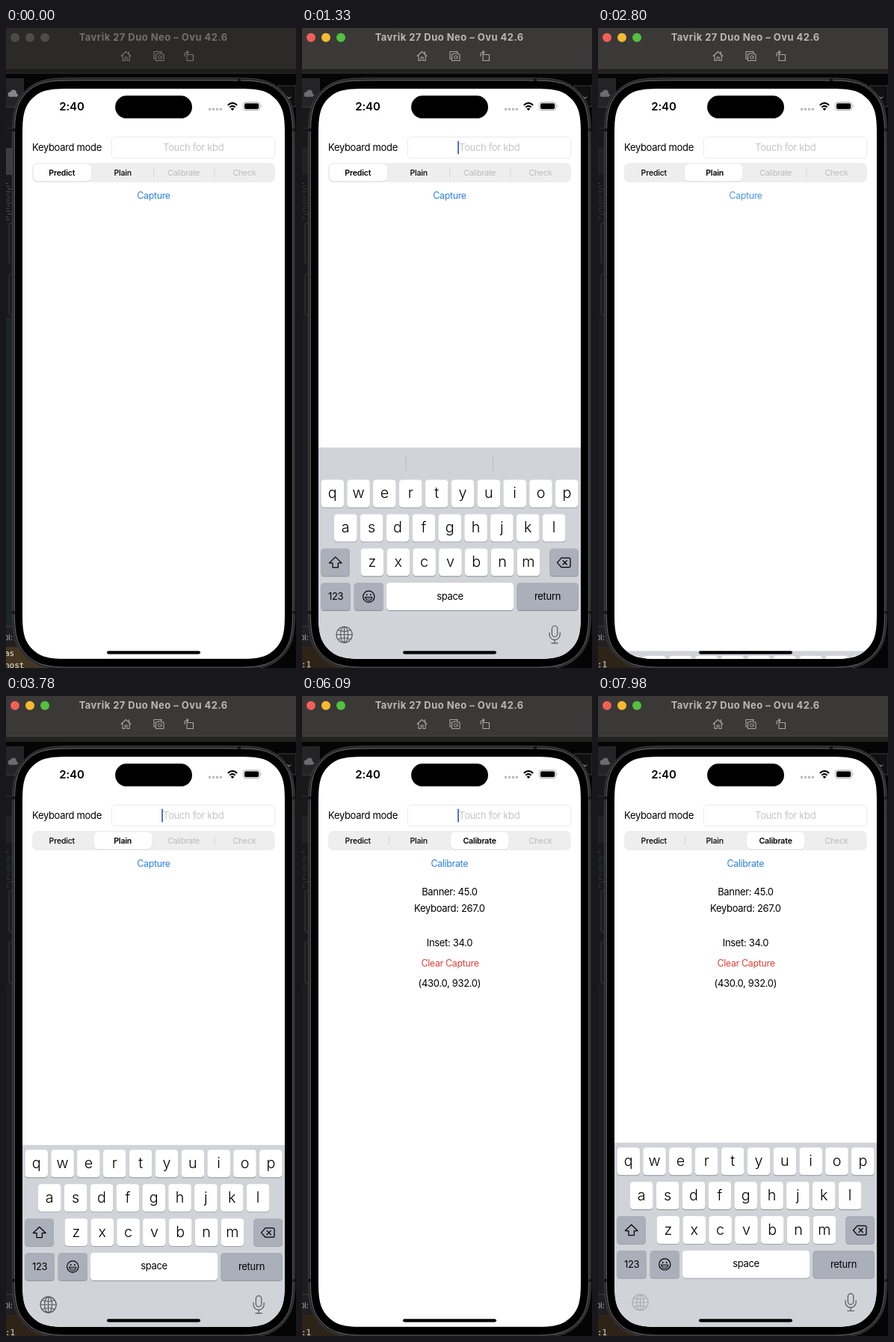
Write an HTML page that moves like this. It is 388 px wide and 854 px high and loops after 8000 ms.

```html
<!DOCTYPE html>
<html lang="en">
<head>
<meta charset="utf-8">
<title>Keyboard mode</title>
<style>
  html, body { margin: 0; width: 100%; height: 100%; overflow: hidden; background: #050505; }
  svg { display: block; width: 388px; height: 854px; }
  text { font-family: Inter, "Open Sans", sans-serif; font-size: 13px; letter-spacing: -.025em; }
  .mid { text-anchor: middle; }
  .title { font-size: 13px; font-weight: 700; letter-spacing: .035em; }
  .clock { font-size: 15px; font-weight: 600; letter-spacing: -.01em; }
  .button { font-size: 12.4px; }
  .segment { font-size: 10.6px; letter-spacing: -.02em; }
  .letter { font-size: 19.8px; font-weight: 300; letter-spacing: 0; }
  .small { font-size: 11px; }
  .mono { font-family: "DejaVu Sans Mono", monospace; font-size: 11px; letter-spacing: 0; }
  .line { fill: none; stroke-linecap: round; stroke-linejoin: round; }
</style>
</head>
<body>
<svg id="stage" viewBox="0 0 388 854"></svg>
<script>
const LOOP = 8000, STEP = 70;
const stage = document.getElementById('stage');

function add(parent, tag, attrs = {}, text) {
  const node = document.createElementNS('http://www.w3.org/2000/svg', tag);
  set(node, attrs);
  if (text !== undefined) node.textContent = text;
  return parent.appendChild(node);
}
function set(node, attrs) {
  for (const name in attrs) node.setAttribute(name, attrs[name]);
}
const group = (parent, attrs) => add(parent, 'g', attrs);
const box = (parent, x, y, width, height, fill, rx = 0, more = {}) =>
  add(parent, 'rect', { x, y, width, height, fill, rx, ...more });
const dot = (parent, cx, cy, r, fill) => add(parent, 'circle', { cx, cy, r, fill });
const label = (parent, x, y, text, fill = '#000', cls = 'mid') =>
  add(parent, 'text', { x, y, fill, class: cls }, text);
const line = (parent, d, stroke, width = 1, more = {}) =>
  add(parent, 'path', { d, stroke, 'stroke-width': width, class: 'line', ...more });

// Rounded rectangle with continuous corners
function squircle(l, t, r, b, radius) {
  const [end, far, near, mid, low, arc, bend] =
    [1.5287, 1.0885, .8684, .6315, .0749, .3728, .1691].map(v => v * radius);
  const half = [[far, 0], [near, 0], [mid, low], [arc, bend], [bend, arc], [low, mid], [0, near], [0, far], [0, end]];
  const corner = (x, y, sx, sy, flip) => {
    const points = flip ? half.map(([u, v]) => [v, u]) : half;
    return 'C' + points.map(([u, v]) => `${x + sx * u} ${y + sy * v}`).join(' ');
  };
  return `M${l + end} ${t}H${r - end}` + corner(r, t, -1, 1) +
    `V${b - end}` + corner(r, b, -1, -1, true) +
    `H${l + end}` + corner(l, b, 1, -1) +
    `V${t + end}` + corner(l, t, 1, 1, true) + 'Z';
}

const SCREEN = squircle(22, 81, 373, 841.8, 45);
const defs = add(stage, 'defs');
add(add(defs, 'clipPath', { id: 'screen' }), 'path', { d: SCREEN });

// Desktop behind the simulator window
function desktop(active) {
  const g = group(stage);
  const cloud = active ? '#6c6c6f' : '#858588';
  box(g, 0, 54, 388, 800, '#050505');
  box(g, 0, 55, 388, 5, active ? '#222221' : '#1c1c1b');
  box(g, 0, 67, 24, 38, '#242426');
  dot(g, 6, 88.5, 3.2, cloud);
  dot(g, 10, 86.5, 4, cloud);
  box(g, 3, 87.5, 13, 4.2, cloud, 2);
  box(g, 0, 105, 24, 1, '#3c3c3e');
  box(g, 0, 106, 12, 54, '#19191b');
  box(g, 0, 133, 12, 1, '#2e2e31');
  box(g, 0, 160, 12, 36, active ? '#222226' : '#3c3c42');
  box(g, 0, 196, 12, 190, '#19191c');
  for (let i = 0; i < 14; i++) {
    const tint = active ? ['#2d4245', '#37313d', '#33383a'][i % 3] : '#50515a';
    box(g, i % 3, 207 + i * 3.7, 3 + i * 5 % 4, 1, tint);
  }
  box(g, 0, 386, 12, 412, active ? '#1d1c23' : '#1e2525');
  box(g, 0, 798, 60, 28, '#202022');
  box(g, 0, 798, 12, 1, '#3c3c3f');
  label(g, -3, 817, 'ol:', '#a5a5a5', 'small');
  box(g, 0, 826, 60, 28, active ? '#2d2417' : '#443620');
  if (active) label(g, -1, 853, ':1', '#d8d8d8', 'mono');
  else {
    label(g, -2, 838, 'as', '#eee', 'mono');
    label(g, -2, 854, 'nost', '#eee', 'mono');
  }
  box(g, 364, 77, 24, 28, '#101011', 0, { stroke: '#3a3a3c' });
  line(g, 'M377 92l2 2 2-2', '#aaa');
  return g;
}

function windowBar(active) {
  const g = group(stage);
  const ink = active ? '#a9a8a6' : '#777674';
  box(g, 0, 0, 388, 54, active ? '#3a3937' : '#2b2a28');
  box(g, 0, 53.5, 388, 1, active ? '#504f4d' : '#403f3d');
  box(g, 0, 60, 388, .8, '#343433');
  const lights = active ? ['#f25f57', '#f6bb2f', '#52c140'] : ['#4d4c4a', '#4d4c4a', '#4d4c4a'];
  lights.forEach((fill, i) => dot(g, 12 + i * 20, 12.8, 6, fill));
  label(g, 197.2, 17.2, 'Tavrik 27 Duo Neo – Ovu 42.6', active ? '#b9b8b6' : '#71706e', 'mid title');
  line(g, 'M154 37.5l6.5-6 6.5 6M156 36.5v7h3.2v-4.5h2.8v4.5h3.2v-7M164.5 34v-2.5', ink, 1.1);
  line(g, 'M199.5 41h-1.5v-9.5h10v1.5M200.5 35h2.2l1-1.3h4l1 1.3h2.3v8.5h-10.5z', ink, 1.1);
  add(g, 'circle', { cx: 205.8, cy: 39, r: 2.2, stroke: ink, class: 'line' });
  line(g, 'M242 35.5h8.5v8h-8.5zM239 37.5v-2q0-3 3-3h1.5M242 30.5l2 2-2 2', ink, 1.1);
  return g;
}

const idle = [desktop(false), windowBar(false)];
const live = [desktop(true), windowBar(true)];

// Phone body
[260, 328].forEach(y => box(stage, 4, y, 6, 55, '#1b1b1c', 2, { stroke: '#454547', 'stroke-width': .8 }));
add(stage, 'path', { d: squircle(8.5, 66.8, 386.5, 856, 59), fill: '#252526', stroke: '#414143' });
add(stage, 'path', { d: squircle(11.3, 69.8, 383.7, 853, 56), fill: '#000', stroke: '#5d5d5f', 'stroke-width': 1.2 });
[8, 383.5].forEach(x => [134, 778].forEach(y => box(stage, x, y, 4, 4, '#171718')));
box(stage, 310, 67, 4, 4, '#171718');
add(stage, 'path', { d: SCREEN, fill: '#fff' });

// Status bar
label(stage, 88, 110.3, '2:40', '#000', 'mid clock');
box(stage, 146.1, 90.2, 102.9, 30.4, '#000', 15.2);
for (let i = 0; i < 4; i++) box(stage, 271 + i * 4.9, 106.7, 3.2, 3.2, '#b9b9bb', 1);
line(stage, 'M296.8 103q6.2-5.6 12.4 0M299.3 105.8q3.7-3.3 7.4 0', '#000', 2.1, { style: 'stroke-linecap:butt' });
add(stage, 'path', { d: 'M303 110.3l-2.4-2.5q2.4-2 4.8 0z' });
box(stage, 317.4, 99, 22.4, 10.8, 'none', 3.4, { stroke: '#a2a2a4', 'stroke-width': .9 });
box(stage, 319, 100.6, 19.2, 7.6, '#000', 2);
add(stage, 'path', { d: 'M341 102.8q1.6 1.6 0 3.4z', fill: '#a2a2a4' });

// Form
label(stage, 35, 164.3, 'Keyboard mode', '#000', '');
box(stage, 141.3, 145.5, 218.4, 28, '#fff', 4.5, { stroke: '#e8e8e9', 'stroke-width': .9 });
label(stage, 250.7, 164.3, 'Touch for kbd', '#c5c5c7');
const caret = box(stage, 208.2, 150.5, 1.8, 18, '#3f63c4', .8);

const SEGMENT = 81.25;
box(stage, 35, 180, 325, 26.1, '#eeeeef', 7.2);
const dividers = [1, 2, 3].map(i => box(stage, 34.8 + i * SEGMENT, 186.5, .9, 13, '#d3d3d6'));
const pill = group(stage);
box(pill, 36.2, 182.2, 78.2, 23, '#000', 5.8, { opacity: .06 });
box(pill, 36.5, 181.7, 77.6, 22.8, '#000', 5.6, { opacity: .06 });
box(pill, 36.5, 181.6, 77.6, 22.6, '#fff', 5.6);
const segments = ['Predict', 'Plain', 'Calibrate', 'Check'].map((name, i) =>
  label(stage, 74.8 + i * 81.4, 196.8, name, '#000', 'mid segment'));

const capture = label(stage, 197.5, 228.3, 'Capture', '#2b80e8', 'mid button');
const calibrate = label(stage, 197.3, 228.3, 'Calibrate', '#2b80e8', 'mid button');
const readout = group(stage);
[['Banner: 45.0', 265.6], ['Keyboard: 267.0', 288.4], ['Inset: 34.0', 334], ['(430.0, 932.0)', 388]]
  .forEach(([text, y]) => label(readout, 197.4, y, text));
label(readout, 198, 360.7, 'Clear Capture', '#dc4237', 'mid button');

// Keyboard, laid out at its resting place
const TOP = 596.1, BAR = 36.7, HEIGHT = 245.7, ROW = 45.8;
const board = group(group(stage, { 'clip-path': 'url(#screen)' }));
box(board, 22, TOP, 351, HEIGHT + 2, '#d0d3d8');
const bar = group(board);
box(bar, 22, TOP - BAR, 351, BAR + 1, '#d0d3d8');
[138.6, 255].forEach(x => box(bar, x, 570, 1, 20, '#b7bac0'));

const rowY = i => 602.5 + i * ROW;
function key(x, row, w, fill = '#fff') {
  box(board, x, rowY(row) + .9, w, 36.8, '#8d9095', 4.2);
  box(board, x, rowY(row), w, 36.8, fill, 4.2);
}
[['qwertyuiop', 25.4], ['asdfghjkl', 43], ['zxcvbnm', 78.6]].forEach(([chars, left], row) =>
  [...chars].forEach((char, i) => {
    const x = left + i * 34.85;
    key(x, row, 30.6);
    label(board, x + 15.3, rowY(row) + 24.4, char, '#000', 'mid letter');
  }));
const GREY = '#abafba';
key(25.4, 2, 38.4, GREY);
key(331.4, 2, 38.4, GREY);
key(25.4, 3, 39.6, GREY);
key(69.7, 3, 39.3, GREY);
key(113, 3, 170);
key(287.5, 3, 82.3, GREY);
label(board, 45.2, 763.1, '123');
label(board, 198, 762.4, 'space');
label(board, 328.5, 763.1, 'return');

line(board, 'M44.7 705.5l8.3 8h-4.6v6h-7.4v-6h-4.600z', '#000', 1.25);
line(board, 'M347 706.8h10q2 0 2 2v8.400q0 2-2 2h-10l-5.500-6.200zM349 710.300l5.400 5.400m0-5.400l-5.400 5.400', '#000', 1.25);
add(board, 'circle', { cx: 89.3, cy: 758.4, r: 7.6, stroke: '#000', 'stroke-width': 1.2, class: 'line' });
dot(board, 86.7, 756, 1, '#000');
dot(board, 91.9, 756, 1, '#000');
line(board, 'M84.600 759.200h9.400q-.8 4.600-4.700 4.600t-4.700-4.600z', '#000', 1);
line(board, 'M85.800 761.400h7', '#000', .6);

const globe = group(board, { stroke: '#54575c', 'stroke-width': 1.1 });
add(globe, 'circle', { cx: 56.6, cy: 809.2, r: 10.6, class: 'line' });
add(globe, 'ellipse', { cx: 56.6, cy: 809.2, rx: 5, ry: 10.6, class: 'line' });
add(globe, 'path', { d: 'M46 809.2h21.2M56.6 798.6v21.2M48.5 803q8.100 4 16.2 0M48.5 815.4q8.100-4 16.2 0', class: 'line' });
box(board, 334.4, 797.4, 7.4, 14.5, 'none', 3.7, { stroke: '#54575c', 'stroke-width': 1.2 });
line(board, 'M331 806.5v2.5a7.1 7.1 0 0 0 14.2 0v-2.5M338.1 816.2v4.3M333.8 820.5h8.600', '#54575c', 1.2);

box(stage, 135, 831.3, 125, 4.1, '#000', 2.05);

// Motion
const keyboardMoves = [[840, 1], [2530, 0], [3430, 1], [4805, 0], [6160, 1]];
const pillMoves = [[2490, 1], [4785, 2]];
const caretSteps = [
  [770, 1], [1750, .65], [1820, .3], [1890, 0],
  [3360, 1], [4410, .45], [4480, 0],
  [6090, 1], [7140, .45], [7210, 0], [7770, .5], [7840, 1], [7980, 0]
];

const ramp = (t, from, to) => Math.min(1, Math.max(0, (t - from) / (to - from)));
const held = (steps, t) => steps.reduce((value, [at, next]) => t >= at ? next : value, 0);

// Critically damped spring: progress from 0 to 1
function spring(ms) {
  const x = Math.max(0, ms) * .01826;
  return 1 - (1 + x) * Math.exp(-x);
}
const follow = (moves, t) =>
  moves.reduce((value, [at, next]) => value + (next - value) * spring(t - at), 0);

const show = (node, on) => set(node, { visibility: on ? 'visible' : 'hidden' });

function draw(t) {
  const active = t >= 630, unlocked = t >= 4830, predict = t < 2520;
  idle.forEach(node => show(node, !active));
  live.forEach(node => show(node, active));

  const selected = unlocked ? 2 : t >= 2450 ? 1 : 0;
  set(pill, { transform: `translate(${follow(pillMoves, t) * SEGMENT} 0)` });
  segments.forEach((node, i) => {
    const enabled = i < 2 || i === 2 && unlocked;
    set(node, {
      fill: enabled ? '#000' : '#bbbbbd',
      'font-weight': i === selected ? 600 : enabled ? 500 : 400
    });
  });
  dividers.forEach((node, i) => show(node, i !== selected && i + 1 !== selected));

  const fade = t < 2450 ? 1 : t < 4620 ? .3 + .7 * ramp(t, 2450, 2900) : .3;
  set(capture, { opacity: unlocked ? 0 : fade });
  set(calibrate, { opacity: ramp(t, 4900, 5250) });
  show(readout, unlocked);
  set(caret, { opacity: held(caretSteps, t) });

  show(bar, predict);
  const hidden = 1 - follow(keyboardMoves, t);
  set(board, { transform: `translate(0 ${hidden * (HEIGHT + (predict ? BAR : 0))})` });
  set(globe, { opacity: t >= 7980 ? .3 : t >= 7910 ? .6 : 1 });
}

const start = performance.now();
function tick() {
  const t = (performance.now() - start) % LOOP;
  draw(Math.floor(t / STEP) * STEP);
  requestAnimationFrame(tick);
}
tick();
</script>
</body>
</html>
```
